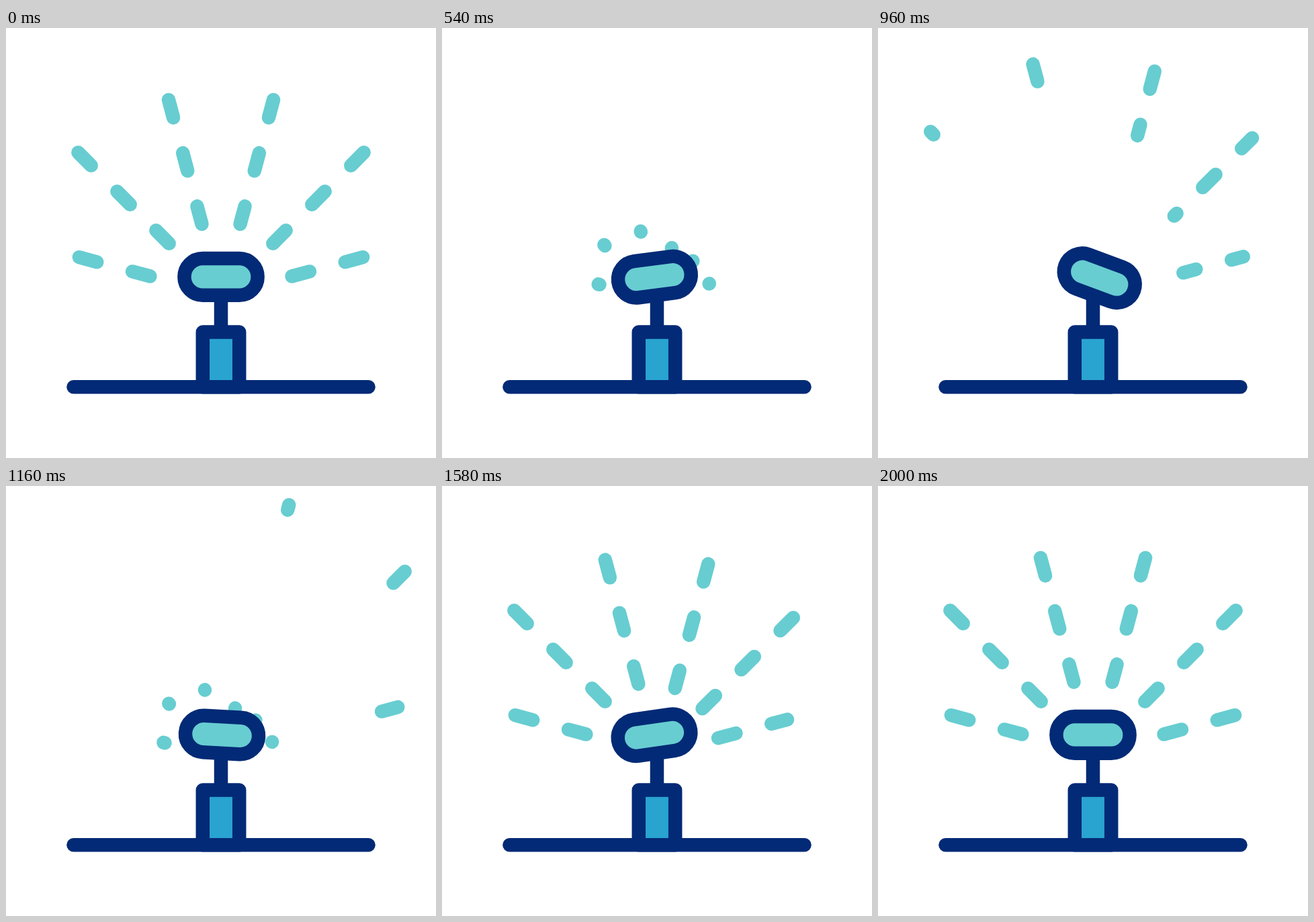
Write an HTML page with a canvas that moves like this. It is 640 px wide and 640 px high and loops after 2.4 s.

```html
<!DOCTYPE html>
<html lang="en">
<head>
<meta charset="utf-8">
<title>Sprinkler</title>
<style>
html, body { margin: 0; width: 100%; height: 100%; overflow: hidden; background: #fff; }
canvas { display: block; width: 640px; height: 640px; }
</style>
</head>
<body>
<canvas id="stage" width="640" height="640"></canvas>
<script>
const ctx = document.getElementById('stage').getContext('2d');
const NAVY = '#032a76', TEAL = '#67cdd1', BLUE = '#29a3d0';
const LOOP = 2400, STEP = 20, WIDTH = 20.5, DASH = 27.4, PITCH = 82;

// Jets run from left to right.
// near / far: offsets where a burst begins and where it dies out.
// out: fade of the first burst, fly: travel of the second, rest: settling of the third.
const jets = [
  { x: 214.5, y: 369.5, deg: 195, n: 2, near: [46.5, 19.5], far: [-46, -9.6], last: [-56, -15],
    move1: 170, out: 215, move2: [510, 868], grow2: 725, cut2: [546, 935], move3: 1444, grow3: 1233 },
  { x: 242.7, y: 320.7, deg: 225, n: 3, near: [19, 22.5], far: [-44, -46], last: [-59, -62],
    move1: 215, out: 252, move2: [510, 925], grow2: 800, cut2: [570, 1040], move3: 1555, grow3: 1317 },
  { x: 291.5, y: 291.8, deg: 255, n: 3, near: [11.5, 38], far: [-14.8, -66.7], last: [-18.5, -78],
    move1: 240, out: 290, move2: [510, 1086], grow2: 885, cut2: [650, 1150], move3: 1667, grow3: 1400 },
  { x: 348.5, y: 291.8, deg: 285, n: 3, near: [-7.5, 39], far: [25.5, -87.7], last: [25, -85],
    move1: 325, out: 324, move2: [465, 1295], grow2: 960, cut2: [679, 1273], move3: 1778, grow3: 1483 },
  { x: 397.3, y: 320.7, deg: 315, n: 3, near: [-26, 28], far: [94.6, -91.3], last: [75, -73],
    move1: 353, out: 366, move2: [465, 1530], grow2: 1040, cut2: [734, 1400], move3: 1889, grow3: 1567 },
  { x: 425.5, y: 369.5, deg: 345, n: 2, near: [-29.5, 11.5], far: [81, -20.5], last: [81, -20.5],
    move1: 403, out: 396, move2: [465, 1510], grow2: 1115, cut2: [800, 1483], move3: 2000, grow3: 1647 }
];

// Head angle: time, degrees
const swing = [[0, 0], [410, 22], [616, -20.5], [972, 20.5], [1403, -22.5], [1702, 0]];

function ease(t, a, b) {
  const x = Math.min(1, Math.max(0, (t - a) / (b - a)));
  return x * x * (3 - 2 * x);
}

function mix(a, b, p) {
  return [a[0] + (b[0] - a[0]) * p, a[1] + (b[1] - a[1]) * p];
}

function headAngle(t) {
  for (let i = 1; i < swing.length; i++) {
    const [t0, a0] = swing[i - 1], [t1, a1] = swing[i];
    if (t < t1) return a0 + (a1 - a0) * ease(t, t0, t1);
  }
  return 0;
}

// One jet, showing the part from..to of all its dashes laid end to end.
function drawJet(jet, offset, from, to) {
  if (to <= from) return;
  const a = jet.deg * Math.PI / 180, c = Math.cos(a), s = Math.sin(a);
  const inward = c < 0;
  ctx.beginPath();
  for (let k = 0; k < jet.n; k++) {
    let p = Math.max(0, from * jet.n - k), q = Math.min(1, to * jet.n - k);
    if (q <= p) continue;
    if (inward) [p, q] = [1 - q, 1 - p];
    const d0 = k * PITCH + p * DASH, d1 = Math.max(d0 + 0.01, k * PITCH + q * DASH);
    const x = jet.x + offset[0], y = jet.y + offset[1];
    ctx.moveTo(x + c * d0, y + s * d0);
    ctx.lineTo(x + c * d1, y + s * d1);
  }
  ctx.stroke();
}

function drawWater(t) {
  ctx.strokeStyle = TEAL;
  for (const j of jets) {
    drawJet(j, mix([0, 0], j.last, ease(t, 0, j.move1)), 0, t >= 1150 ? 0 : 1 - ease(t, 100, j.out));
    drawJet(j, mix(j.near, j.far, ease(t, ...j.move2)), ease(t, ...j.cut2), ease(t, 517, j.grow2));
    drawJet(j, mix(j.near, [0, 0], ease(t, 1150, j.move3)), 0, ease(t, 1150, j.grow3));
  }
}

function line(x0, y0, x1, y1) {
  ctx.beginPath();
  ctx.moveTo(x0, y0);
  ctx.lineTo(x1, y1);
  ctx.stroke();
}

function drawBody(t) {
  ctx.strokeStyle = NAVY;
  line(320, 402, 320, 450);
  ctx.fillStyle = BLUE;
  ctx.beginPath();
  ctx.rect(292.8, 452.4, 54.4, 81.9);
  ctx.fill();
  ctx.stroke();
  line(100.5, 534.3, 539.5, 534.3);

  ctx.save();
  ctx.translate(320, 398.4);
  ctx.rotate(headAngle(t) * Math.PI / 180);
  ctx.fillStyle = TEAL;
  ctx.beginPath();
  ctx.arc(-27.3, -28, 27.3, Math.PI / 2, Math.PI * 1.5);
  ctx.arc(27.3, -28, 27.3, -Math.PI / 2, Math.PI / 2);
  ctx.closePath();
  ctx.fill();
  ctx.stroke();
  ctx.restore();
}

function draw(t) {
  ctx.fillStyle = '#fff';
  ctx.fillRect(0, 0, 640, 640);
  ctx.lineWidth = WIDTH;
  ctx.lineCap = ctx.lineJoin = 'round';
  drawWater(t);
  drawBody(t);
}

let start;
function tick(now) {
  if (start === undefined) start = now;
  const t = (now - start) % LOOP;
  draw(Math.floor(t / STEP) * STEP);
  requestAnimationFrame(tick);
}
draw(0);
requestAnimationFrame(tick);
</script>
</body>
</html>
```
